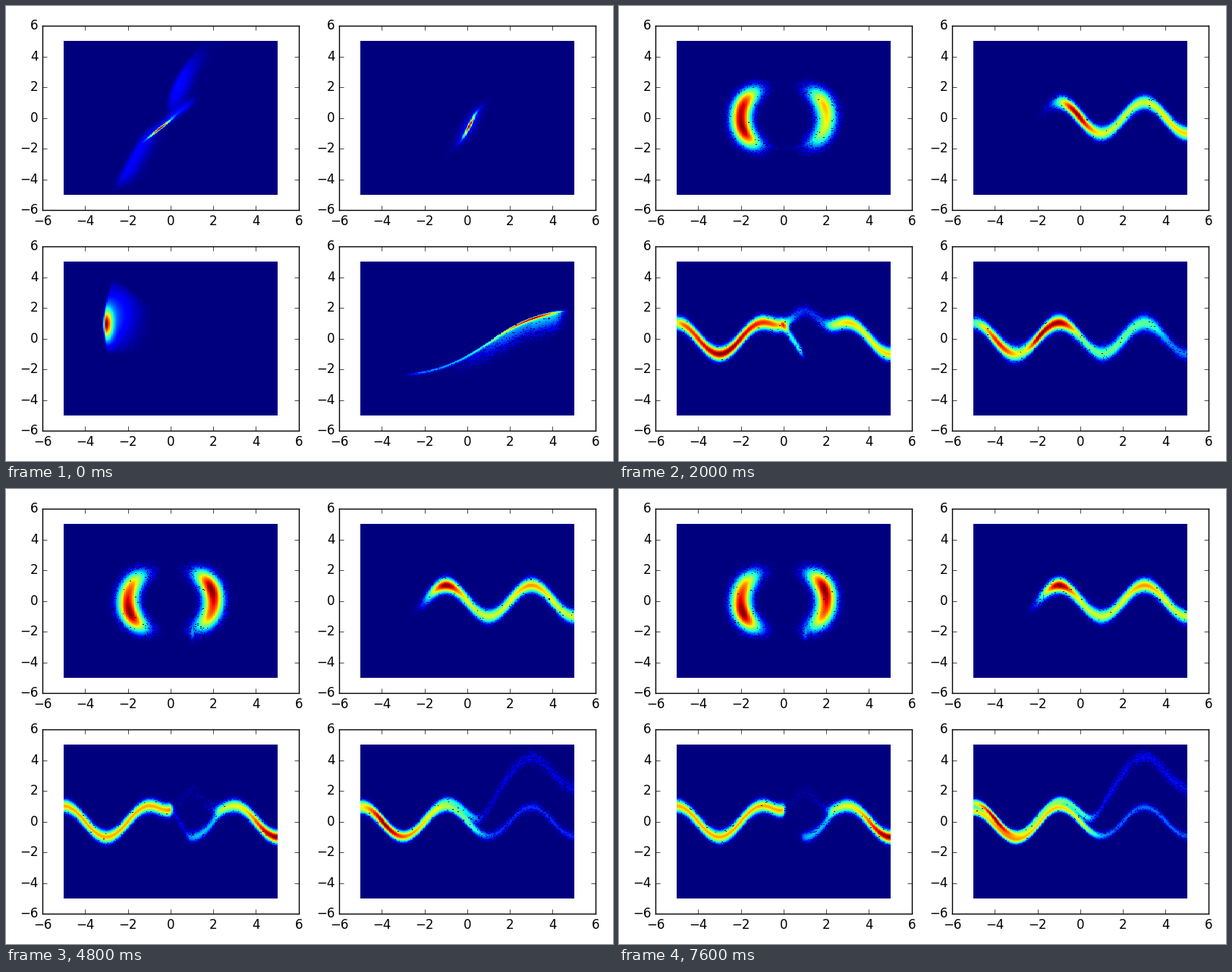
Animation of 800 by 600 pixels, one loop 8000 ms. Source, as a matplotlib script:

```python
import numpy as np
import matplotlib.pyplot as plt
from matplotlib.animation import FuncAnimation

plt.style.use("classic")
plt.rcParams["font.family"] = "DejaVu Sans"

W, H, DPI = 800, 600, 100
FRAMES, INTERVAL = 20, 400
CELLS = 200
grid = -5 + 10 * (np.arange(CELLS) + 0.5) / CELLS
X, Y = np.meshgrid(grid, grid)
R = np.hypot(X, Y)
WAVE = -np.sin(np.pi * X / 2)


def bell(v, center, low, high=None):
    """Gaussian of height 1, optionally wider on its upper side."""
    d = v - center
    return np.exp(-0.5 * (d / (low if high is None else np.where(d < 0, low, high))) ** 2)


def step(v, at, soft):
    return 1 / (1 + np.exp(-np.clip((v - at) / soft, -50, 50)))


def window(v, start, end, soft):
    return step(v, start, soft) * step(-v, -end, soft)


def mix(a, b, t):
    return a + (b - a) * t


def ease(ms, start, end):
    t = np.clip((ms - start) / (end - start), 0, 1)
    return t * t * (3 - 2 * t)


# Untrained densities of the first frame

def start_cross():
    core = bell(Y, 1.12 * X - .12, .06) * bell(X, -.5, .33)
    upper = .14 * bell(X, .07 * Y ** 2, .14, .42) * bell(Y, 2.1, 1.3) * step(Y, .2, .2)
    lower = .12 * bell(X, .4 * Y - .7, .15, .42) * window(Y, -4.2, -1.1, .25)
    tail = .12 * bell(Y, X, .2) * window(X, -1, 1, .15)
    return core + upper + lower + tail


def start_s_curve():
    v = Y + .5
    center = .1 + .35 * v + .05 * v ** 3
    return bell(X, center, .05) * bell(v, 0, .5) + .12 * bell(X, center, .25) * bell(v, 0, .85)


def start_blob():
    center = -3.04 + .05 * (Y - .9) ** 2
    core = .8 * bell(X, center, .06, .22) * bell(Y, .9, .62)
    fan = .24 * bell(X, center, .06, .85) * bell(Y, 1.4, 1.2)
    return core + fan * step(Y, -.9, .1) * step(-X - Y, -1.2, .1)


def start_sail():
    edge = -.25 + 2.3 * np.tanh((X - 1) / 2.5)
    line = bell(Y, edge, .09, .05) * (.35 + .5 * bell(X, 3, .8)) * window(X, -2.6, 4.3, .25)
    body = .45 * bell(Y, edge, .7, .05) * window(X, .8, 4.4, .12 + .6 * (X < 3))
    return line + body


# Learned densities; each stage parameter runs from 0 to 1

def crescents(grow, settle, split):
    ring = bell(R, 2, .4)
    tilt = .15 * np.tanh(Y)
    left = ring * bell(X, -2, .6) * (1 + mix(1, -1, grow) * tilt)
    right = ring * bell(X, 2, .6) * (1 + tilt)
    link = .06 * bell(R, 2, .08) * window(Y, -3, -.3, .2) * (1 - settle)
    spur = .15 * bell(X, 1, .07) * bell(Y, -2.2, .3) * settle
    return left * (1 - .25 * grow * (1 - settle)) + grow * right + grow * link + spur


def long_wave(grow, settle, split):
    reach = step(X, mix(-.1, -1.9, grow), mix(.3, .22, grow))
    hot = .42 * bell(X, mix(.9, -1, grow), mix(.65, .45, grow))
    crest = .15 * settle * bell(X, 3, .6) + .2 * (1 - grow) * step(X, 3.7, .2)
    return bell(Y, WAVE, .32) * reach * (.6 + hot + crest)


def broken_wave(grow, settle, split):
    lift = mix(2.5, 3, grow) * bell(X, 1, mix(.75, .6, grow))
    left = (.7 + .28 * (1 - grow) * bell(X, -2.7, .8)) * window(
        X, mix(-4, -6, grow), .05, mix(.2, .04, settle))
    right = mix(.5 * bell(X, 3, .65), (.6 + .38 * step(X, 4, .3)) * step(X, 2.2, .15), grow)
    bridge = mix(.2, .04, max(grow * .7, settle)) * window(X, 0, 2.4, .1)
    upper = bell(Y, WAVE + lift, mix(.33, .29, grow)) * (left + right + bridge)
    arm = bell(Y, .8 - 2 * X, .25) * window(X, -.1, .9, .05) * mix(.5, .2, grow) * (1 - split)
    lower = .3 * bell(Y, WAVE, .25) * window(X, .85, 2.3, .08) * settle
    haze = .02 * settle * bell(X, 1, .6) * bell(Y, .6, 1)
    return upper + arm + lower + haze


def forked_wave(grow, settle, split):
    waist = .18 * bell(X, -2, .4) + .28 * bell(X, 0, .6)
    early = bell(Y, WAVE + .25 * bell(X, 0, .7), .45 - waist) * (
        .43 * window(X, -4, 3.7, .22) + .6 * bell(X, -2, .33))
    middle = bell(Y, WAVE, .3) * (.32 + .65 * (bell(X, -4, .7) + bell(X, -1, .65)))

    slim = mix(.24, .19, split)
    fade = .2 + .4 * step(-X, -.6, .25)
    low = bell(Y, .92 * WAVE - .28 * split * step(-X, 1.6, .25), slim) * fade
    shift = mix(.12, .2, split) + .3 * bell(X, 0, .9)
    jump = 3 * step(X, 1, .3)
    strength = .12 + (.3 + .45 * bell(X, -4, .55)) * step(-X, -.5, .15)
    high = bell(Y, WAVE + shift + jump, slim + .12 * step(X, 1, .2)) * strength
    haze = .012 * step(X, 1.2, .2) * bell(Y, 1.8, 1)
    return mix(mix(early, middle, grow), low + high + haze, settle)


def panels(frame):
    if frame == 0:
        return [(start_cross(), 60), (start_s_curve(), 60), (start_blob(), 60), (start_sail(), 10)]
    ms = frame * INTERVAL
    stage = ease(ms, 1000, 2800), ease(ms, 2800, 4000), ease(ms, 3600, 6000)
    return [(density(*stage), 9)
            for density in (crescents, long_wave, broken_wave, forked_wave)]


def pixel_axes(left, top, width=337.5, height=243):
    ax = fig.add_axes([left / W, 1 - (top + height) / H, width / W, height / H])
    image = ax.imshow(np.zeros((CELLS, CELLS)), cmap="jet", vmin=0, vmax=1,
                      extent=(-5, 5, -5, 5), origin="lower", aspect="auto",
                      interpolation="nearest")
    ax.set(xlim=(-6, 6), ylim=(-6, 6), xticks=range(-6, 7, 2), yticks=range(-6, 7, 2))
    return image


def update(frame):
    rng = np.random.default_rng(100 + frame)
    for image, (density, fill) in zip(images, panels(frame)):
        q = density / density.max()
        hit = rng.random(q.shape) < 1 - np.exp(-fill * q)  # thin areas leave empty cells
        image.set_data(q * hit)
    return images


fig = plt.figure(figsize=(W / DPI, H / DPI), dpi=DPI, facecolor="white")
images = [pixel_axes(left, top) for top in (26.15, 317.15) for left in (48.17, 439.17)]
anim = FuncAnimation(fig, update, frames=FRAMES, interval=INTERVAL, repeat=True)
plt.show()
```
